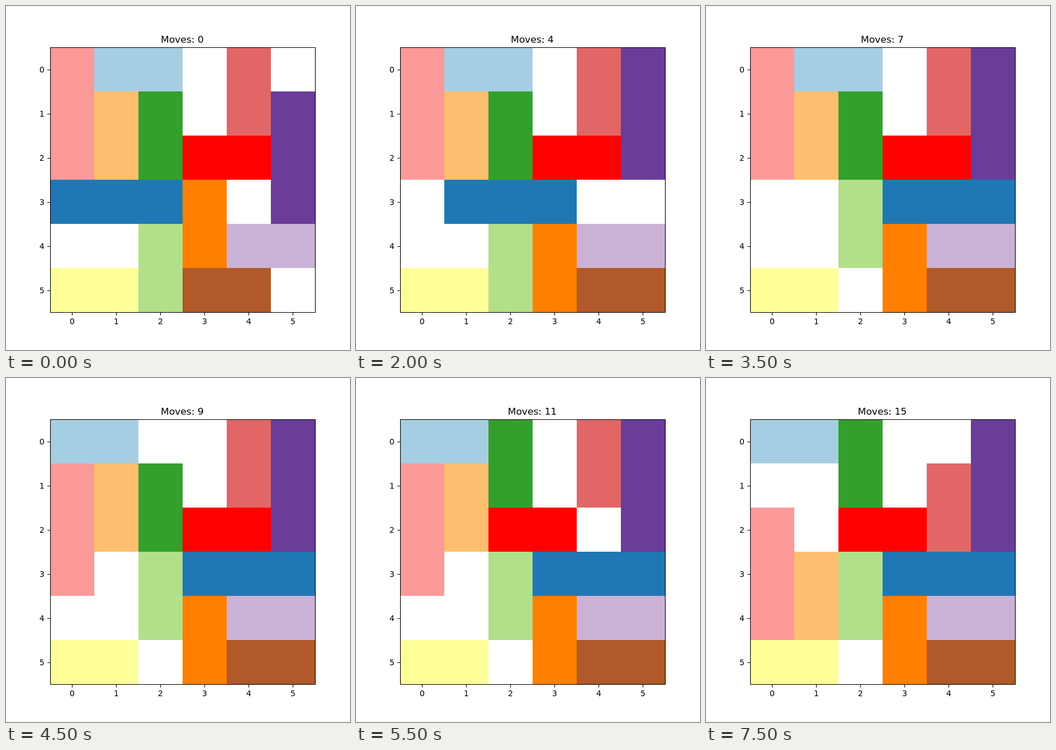
An HTML page that plays this animation: 600x600 px, repeating every 8000 ms.

```html
<!DOCTYPE html>
<html lang="en">
<head>
<meta charset="utf-8">
<title>Sliding blocks</title>
<style>
  html, body { margin: 0; width: 100%; height: 100%; overflow: hidden; background: #fff; }
  svg { display: block; width: 600px; height: 600px; }
  text { font: 13.89px "DejaVu Sans", sans-serif; }
  #title { font-size: 16.667px; text-anchor: middle; }
  #axes { fill: none; stroke: #000; stroke-width: 1.11; }
</style>
</head>
<body>
<svg id="stage" viewBox="0 0 600 600">
  <g id="board"></g>
  <path id="axes"/>
  <g id="labels"></g>
  <text id="title" x="307.5" y="64"></text>
</svg>
<script>
const CELL = 77, LEFT = 77, TOP = 72, STEP = 500;

// name: [column, row, columns wide, rows high, colour]
const blocks = {
  pink:   [0, 0, 1, 3, '#fb9a99'],
  sky:    [1, 0, 2, 1, '#a6cee3'],
  coral:  [4, 0, 1, 2, '#e26666'],
  tan:    [1, 1, 1, 2, '#fdbf6f'],
  green:  [2, 1, 1, 2, '#33a02c'],
  purple: [5, 1, 1, 3, '#6a3d9a'],
  red:    [3, 2, 2, 1, '#ff0000'],
  blue:   [0, 3, 3, 1, '#1f78b4'],
  orange: [3, 3, 1, 2, '#ff7f00'],
  lime:   [2, 4, 1, 2, '#b2df8a'],
  lilac:  [4, 4, 2, 1, '#cab2d6'],
  yellow: [0, 5, 2, 1, '#ffff99'],
  brown:  [3, 5, 2, 1, '#b15928']
};

// Each move slides a block one cell along its own length.
const moves = ('purple- brown+ orange+ blue+ blue+ blue+ lime- pink+ sky- ' +
  'green- red- pink+ coral+ tan+ tan+').split(' ');

const el = id => document.getElementById(id);

function add(parent, tag, attrs, text = '') {
  const node = document.createElementNS('http://www.w3.org/2000/svg', tag);
  for (const key in attrs) node.setAttribute(key, attrs[key]);
  node.textContent = text;
  return parent.appendChild(node);
}

let axes = 'M77.5 72.5H539.5V534.5H77.5Z';
for (let i = 0; i < 6; i++) {
  const x = 115.5 + i * CELL, y = 111.5 + i * CELL;
  axes += `M${x} 535v4.86M77 ${y}h-4.86`;
  add(el('labels'), 'text', { x, y: 555, 'text-anchor': 'middle' }, i);
  add(el('labels'), 'text', { x: 67, y: y + 4.5, 'text-anchor': 'end' }, i);
}
el('axes').setAttribute('d', axes);

const rects = {};
for (const name in blocks) {
  const [, , w, h, fill] = blocks[name];
  rects[name] = add(el('board'), 'rect', { width: w * CELL, height: h * CELL, fill });
}

function show(count) {
  el('title').textContent = 'Moves: ' + count;
  const done = moves.slice(0, count);
  for (const name in blocks) {
    const [col, row, w, h] = blocks[name];
    const shift = done.filter(m => m === name + '+').length - done.filter(m => m === name + '-').length;
    rects[name].setAttribute('x', LEFT + CELL * (col + (w > h ? shift : 0)));
    rects[name].setAttribute('y', TOP + CELL * (row + (h > w ? shift : 0)));
  }
}

let shown = -1;
function tick() {
  const count = Math.floor(performance.now() / STEP) % (moves.length + 1);
  if (count !== shown) show(shown = count);
  requestAnimationFrame(tick);
}
tick();
</script>
</body>
</html>
```
